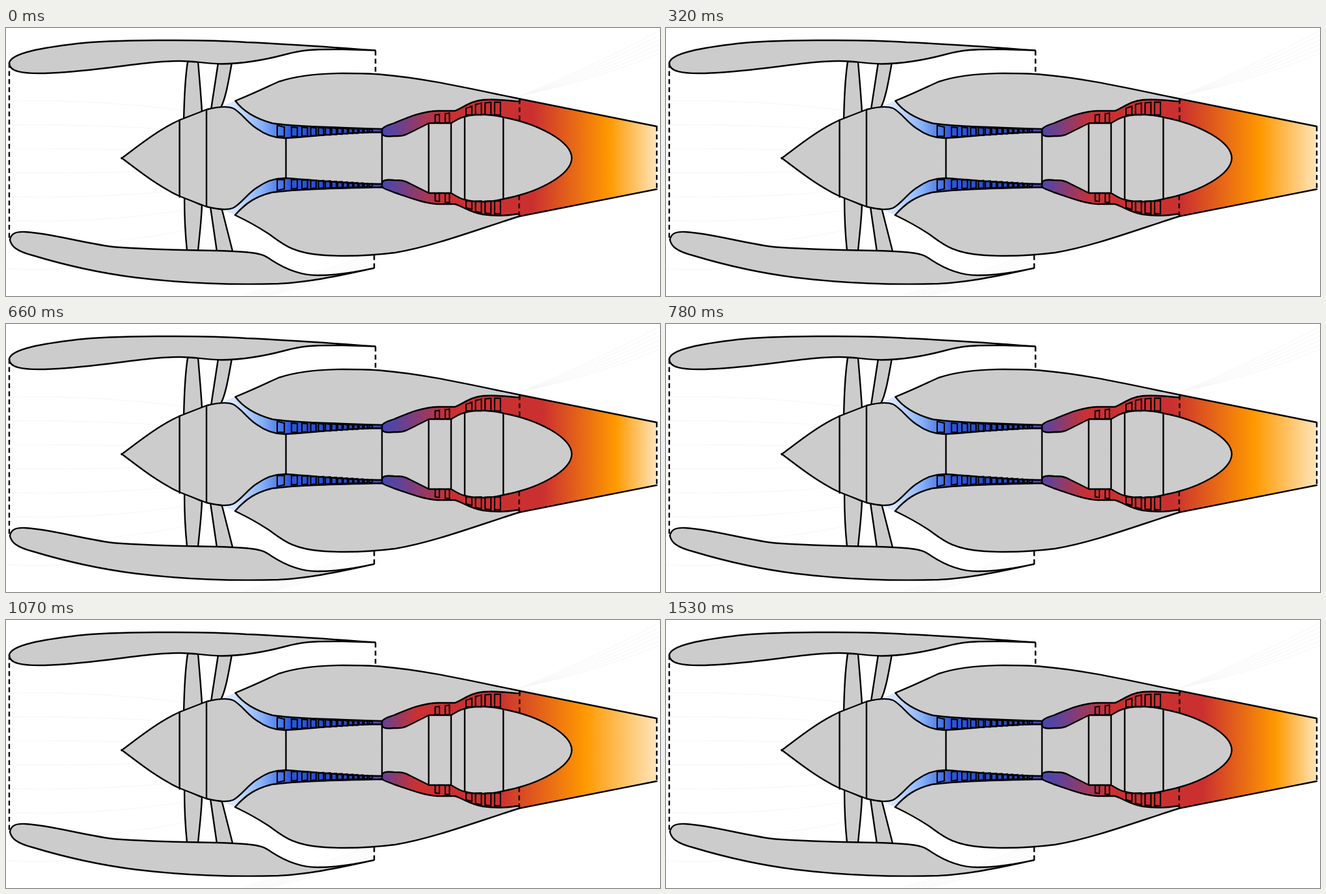
Animation, 1008 px wide and 414 px high, one loop 1600 ms. Source, as an HTML page:

```html
<!DOCTYPE html>
<html lang="en">
<head>
<meta charset="utf-8">
<title>Jet engine section</title>
<style>
  html, body { margin: 0; width: 100%; height: 100%; overflow: hidden; background: #fff; }
  svg { display: block; width: 100vw; height: 100vh; }
  .body { fill: #ccc; }
  .ink { stroke: #000; stroke-width: 2.4; stroke-linejoin: round; stroke-linecap: round; }
  .line { fill: none; }
  .dash { fill: none; stroke-dasharray: 7.5 5; stroke-linecap: butt; }
  .blade { fill: none; stroke-width: 2.1; stroke-linejoin: miter; }
  .stream { fill: none; stroke: #f6f6f6; stroke-width: 1; }
</style>
</head>
<body>
<svg viewBox="0 0 1008 414" preserveAspectRatio="none">
  <defs>
    <linearGradient id="heat" gradientUnits="userSpaceOnUse" x1="333" y1="0" x2="1003" y2="0"></linearGradient>
    <path id="half" d="M178 201.500C205 181 235 157 268 142L309 126C325 122 340 120 350 124C362 130 372 146 386 155C400 165 415 171 432 170C480 167 520 161 579.500 161C579 168 588 168 598 167C610 167 615 166 622 162L652 147H686C695 142 700 138 707 137C720 133 745 132 767 138C820 148 872 175 872 201.500"/>
  </defs>
  <g id="streams" class="stream"></g>

  <!-- fan struts -->
  <g class="body ink">
    <path d="M280 52C275 85 275 110 274 140L302 130C301 110 299 88 296 52Z"/>
    <path d="M327 54L316 126L331 123C338 110 342 88 348 54Z"/>
    <path d="M275 262C275 300 277 325 279 344H296C298 322 301 300 302 274Z"/>
    <path d="M315 276L325 345L349.500 346L332 277Z"/>
  </g>

  <!-- nacelle -->
  <g class="body ink">
    <path d="M5 54C8 38 60 30 110 24C160 18.500 300 17 370 22C440 25 505 30 569 34.500L520 33C470 32.500 455 34 430 41C400 49 370 55 332 55.500C300 54 290 51 268 51C210 51 150 66 70 69.500C20 72 5 66 5 54Z"/>
    <path d="M6 327C8 318 14 314 30 315C70 317 130 335 170 338.500C220 342 270 343 300 343.500C340 344 360 345 377 347C395 349 400 352 410 359C430 372 455 382 480 382C510 382 540 377 567 371C520 381 475 392 420 395C350 397 270 394 200 385.500C140 378 90 366 42 351.500C16 345 8 337 6 327Z"/>
  </g>

  <path fill="url(#heat)" d="M333 121L353 112L792 109L1003 152V249L791 291L353 289L333 280Z"/>

  <!-- core cowl -->
  <g class="body ink">
    <path d="M353.500 112.500C380 102 400 92 420 83C450 73 490 70 520 70C550 70 560 70 580 72C650 78 720 95 792 109.500V113.500C770 112 755 109 735 111C715 113 705 123 692 128H665C640 129 620 138 598 147C590 150 583 151 580 156C500 153 440 152 410 147C385 140 365 128 353.500 112.500Z"/>
    <path d="M353 289C370 297 385 305 405 318C425 332 440 348 490 351C520 353 560 352 600 347C660 337 730 310 791 291V287C770 290 755 291 735 288C715 285 705 276 692 272H665C645 271 625 263 598 254C590 250 583 249 580 246C500 248 450 249 410 254C385 260 370 270 353 289Z"/>
  </g>

  <!-- shaft, turbine and tail cone -->
  <g class="body ink">
    <use href="#half"/>
    <use href="#half" transform="matrix(1 0 0 -1 0 402)"/>
  </g>
  <path class="ink line" d="M267.500 142V261M309 126V276M431.500 170V232M579.500 156V246M651.500 147V253M686 147V253M707 137V264M766.500 138V262M792 109.500L1003 152M791 291L1003 249"/>
  <path class="ink dash" d="M5 54V327M569.500 35V71M567.500 371V348M791.500 110V146M791 291V256M1003 152V249"/>
  <g id="blades" class="ink blade"></g>
</svg>
<script>
const LOOP = 1600;
const $ = id => document.getElementById(id);

function add(tag, parent, attrs) {
  const el = document.createElementNS("http://www.w3.org/2000/svg", tag);
  for (const k in attrs) el.setAttribute(k, attrs[k]);
  parent.appendChild(el);
  return el;
}

// A blade above the axis and its mirror image below.
function blade(x, w, top, slant, hub) {
  for (const y of [v => v, v => 401.5 - v])
    add("path", $("blades"), { d: `M${x} ${y(hub)}V${y(top)}L${x + w} ${y(top + slant)}V${y(hub + 0.5)}Z` });
}

// Compressor: stages shrink and crowd together towards the combustor.
blade(418, 11, 150.5, 2.5, 167);
for (let i = 0, x = 440; i < 13; x += 7.5 + 8.5 * 0.72 ** i++)
  blade(x, 9 - i * 0.35, 153 + i * 0.25, 1, 167 - i * 0.55);

// Turbine: two short stages, then four that follow the widening duct.
for (let i = 0; i < 2; i++) blade(661.5 + i * 15.5, 6.5, 134.5 - i * 2, -1, 146);
for (let i = 0; i < 4; i++) blade(709 + i * 14.7, 9, 114 + 10 * 0.4 ** i, i - 3, 134);

// Barely visible streamlines.
for (let y = 113; y < 400; y += 37)
  add("path", $("streams"), { d: `M0 ${y}Q140 ${y - (200 - y) * 0.04} 270 ${y + (200 - y) * 0.16}` });
for (let i = 0; i < 6; i++) {
  add("path", $("streams"), { d: `M${790 + i * 4} ${106 - i}Q${900 + i * 3} ${62 + i * 3} 1008 ${4 + i * 7}` });
  add("path", $("streams"), { d: `M${365 + i * 8} 413Q${460 + i * 5} ${385 + i * 2} 575 ${345 + i * 4}` });
}

// Turning points of the drifting heat: time and drift (0 = left, 1 = right).
const DRIFT = [[0, 0.78], [320, 0.5], [600, 1], [780, 0.3], [1070, 0], [1320, 0.62], [1530, 1], [LOOP, 0.78]];
const HOLD = 70;
const clamp = v => Math.max(0, Math.min(1, v));

function drift(t) {
  const i = DRIFT.findIndex(([time]) => time > t);
  const [ta, a] = DRIFT[i - 1], [tb, b] = DRIFT[i];
  const k = clamp((t - ta - HOLD) / Math.max(1, tb - ta - HOLD));
  return a + (b - a) * k * k * (3 - 2 * k);
}

// Each colour rests at x and travels by the given span with the drift.
const COLORS = [
  ["#dce8ff", 333, 0],
  ["#d8e6ff", 352, 0],
  ["#86b0f7", 395, 0],
  ["#2a56dc", 439, 0],
  ["#2a48c8", 545, 0],
  ["#5844a0", 574, 26],
  ["#cb3032", 632, 52],
  ["#cb3030", 761, 66],
  ["#ff9900", 893, 47],
  ["#ffe5ba", 1003, 0]
];
const stops = COLORS.map(([color]) => add("stop", $("heat"), { "stop-color": color }));

function draw(t) {
  const s = drift(t);
  COLORS.forEach(([, x, span], i) => stops[i].setAttribute("offset", (x + span * s - 333) / 670));
}

const t0 = performance.now();
function tick() {
  draw((performance.now() - t0) % LOOP);
  requestAnimationFrame(tick);
}
tick();
</script>
</body>
</html>
```
